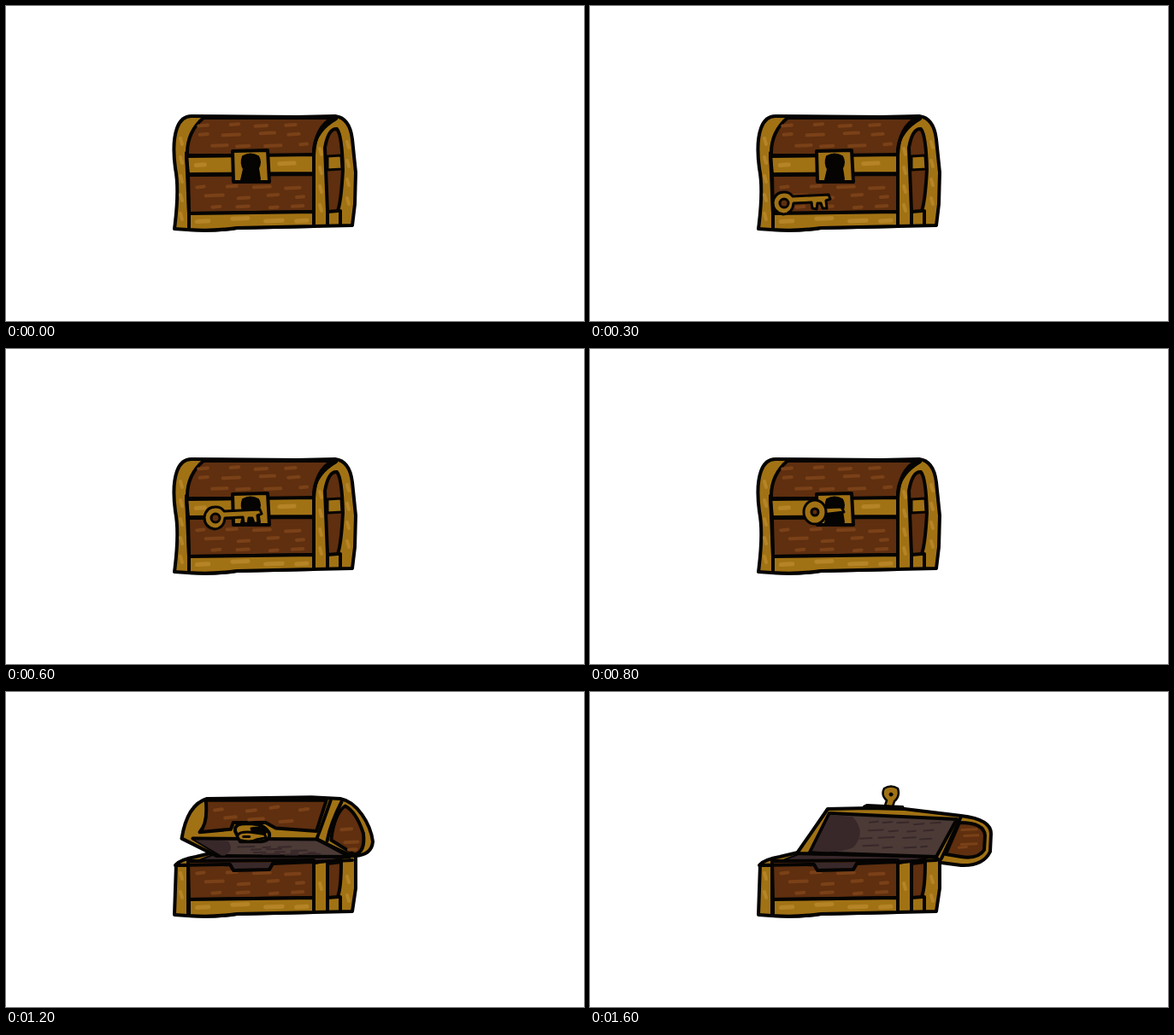
These frames come from a looping animation (676x369 px, 1800 ms). An HTML page:

```html
<!DOCTYPE html>
<html lang="en">
<head>
<meta charset="utf-8">
<title>Treasure chest</title>
<style>
html, body { margin: 0; width: 100%; height: 100%; overflow: hidden; background: #fff; }
svg { display: block; width: 676px; height: 369px; }
</style>
</head>
<body>
<svg id="stage" viewBox="0 0 676 369" stroke-linecap="round" stroke-linejoin="round"></svg>
<script>
const stage = document.getElementById('stage');
const LOOP = 1800, STEP = 100;
const GOLD = '#a17214', SHINE = '#b58426', WOOD = '#5f2f0f', GRAIN = '#7a4118';
const INSIDE = '#4b3a36', SHADE = '#38282a', INK = '#050403';

const path = (d, fill = 'none', w = 4, ink = INK) =>
  `<path d="${d}" fill="${fill}" stroke="${ink}" stroke-width="${w}"/>`;
const ellipse = (x, y, rx, ry, fill, w = 3) =>
  `<ellipse cx="${x}" cy="${y}" rx="${rx}" ry="${ry}" fill="${fill}" stroke="${INK}" stroke-width="${w}"/>`;

function seeded(seed) {
  return () => (seed = (seed * 16807) % 2147483647) / 2147483647;
}

// Rows of short brush strokes inside a box; lean shifts each row sideways.
function strokes(x, y, w, h, rows, lean = 0, gap = 20) {
  const rnd = seeded(Math.round(x * 31 + y * 7 + w));
  let d = '';
  for (let r = 0; r < rows; r++) {
    const k = rows > 1 ? r / (rows - 1) : 0.5;
    const left = x + lean * k;
    for (let at = rnd() * gap; at < w - 6;) {
      const len = Math.min(8 + rnd() * 12, w - at);
      const py = y + h * k + (rnd() - 0.5) * 4;
      d += `M${left + at} ${py} L${left + at + len} ${py - 0.8} `;
      at += len + gap * (0.5 + rnd());
    }
  }
  return d;
}

// Shine marks spaced down a narrow post.
function postShine(x, top, bottom) {
  let d = '';
  for (let y = top; y < bottom; y += 22) d += `M${x} ${y} L${x + 2} ${y + 7} `;
  return path(d, 'none', 4, SHINE);
}

function lowerFront() {
  return path('M213 198 L360 197 L360 241 L214 243 Z', WOOD) +
    path(strokes(222, 212, 126, 23, 3), 'none', 4, GRAIN) +
    path('M214 243 L360 241 L360 258 L270 260 Q242 264 214 262 Z', GOLD) +
    path(strokes(222, 251, 130, 0, 1), 'none', 5, SHINE);
}

function sidePosts(top) {
  return path('M376 241 V256 M391 240 V256') + postShine(204, top, 245) +
    postShine(367, top + 12, 245) + postShine(399, top + 4, 245);
}

function closedChest() {
  return path('M197 261 Q203 215 198 190 Q194 160 200 143 Q205 129 217 129 L340 130 ' +
      'L385 129 Q402 131 405 156 L409 195 L408 232 L405 257 L270 260 Q240 265 197 261 Z', GOLD) +
    path('M212 175 Q211 148 231 131 L382 131 Q361 142 360 175 Z', WOOD) +
    path(strokes(224, 139, 128, 24, 3), 'none', 4, GRAIN) +
    path('M211 176 L360 174 L360 196 L213 197 Z', GOLD) +
    path(strokes(221, 186, 36, 0, 1) + strokes(318, 185, 36, 0, 1), 'none', 5, SHINE) +
    lowerFront() +
    path('M214 243 L211 172 M360 258 L360 168 Q362 146 386 132') +
    path('M376 241 L373 166 Q377 143 387 144 Q393 151 394 192 Q392 229 388 240 Z', WOOD) +
    path('M376 176 L392 175 L393 191 L376 192 Z', GOLD, 3) +
    sidePosts(155) +
    path('M265 170 L306 169 L308 206 L266 206 Z', GOLD) +
    path('M277 176 Q286 171 295 176 Q299 183 295 190 L297 203 L275 204 L278 191 Q274 184 277 176 Z', INK, 2);
}

function openBase() {
  return path('M197 261 L199 202 Q205 196 222 193 L243 188 L409 192 L409 230 L405 257 L270 260 Q240 265 197 261 Z', GOLD) +
    path('M213 202 L244 190 L402 193 L362 201 Z', SHADE, 2) +
    lowerFront() +
    path('M262 200 L312 200 L308 208 L267 209 Z', SHADE, 0) +
    path('M198 203 L262 202 L266 209 L308 208 L312 201 L405 197 M213 203 V260 M360 200 V258') +
    path('M376 201 L392 199 Q392 229 388 240 L376 241 Z', WOOD) +
    sidePosts(212);
}

// Bends the half-raised lid towards its closed shape, hinged at y 192.
const bend = d => d.replace(/(-?[\d.]+) (-?[\d.]+)/g, (_, x, y) => {
  const k = Math.max(0, (192 - y) / 72);
  return `${(+x - 27 * k * k).toFixed(1)} ${(+y + 60 * k * (1 - k) + 5 * k).toFixed(1)}`;
});

function risingLid(low) {
  const p = (d, ...style) => path(low ? bend(d) : d, ...style);
  return p('M213 154 Q236 124 262 120 L385 119 L418 120 C436 122 441 139 435 158 Q428 185 408 191 L246 191 Z', GOLD) +
    p('M260 121 L401 121 L374 146 L328 143 L319 138 L281 138 L275 144 L237 147 Q251 139 260 121 Z', WOOD) +
    p(strokes(264, 128, 112, 8, 2, -6), 'none', 4, GRAIN) +
    p('M226 154 L371 155 L402 193 L252 191 Z', INSIDE) +
    p('M228 156 L266 157 Q270 172 256 188 L252 189 Z', SHADE, 0) +
    p(strokes(274, 165, 74, 18, 4, 22, 10), 'none', 2, SHADE) +
    p('M387 156 Q403 131 420 125 Q430 129 428 148 Q422 176 408 184 Z', WOOD) +
    p(strokes(403, 146, 20, 24, 3, -2, 8), 'none', 4, GRAIN) +
    p('M371 154 Q387 137 406 121 M382 157 Q394 139 418 122 M371 155 L404 192') +
    p('M279 146 Q282 138 298 139 Q316 138 318 148 Q316 159 298 158 L280 158 Z', GOLD) +
    p('M299 143 Q314 141 315 147 Q308 152 298 149 Z', INK, 2) +
    p('M279 152 Q282 146 297 147 L312 149 L312 153 L301 155 Q291 160 280 156 Z', GOLD, 3) +
    p('M286 152 L293 152', 'none', 3);
}

function raisedLid() {
  return path('M320 134 L324 132 L366 134 L368 138 L320 137 Z', INK, 2) +
    path('M345 133 L347 127 Q340 121 344 113 Q352 108 360 113 Q363 122 356 128 L354 134 Z', GOLD, 2.5) +
    ellipse(352, 120, 2, 2, INK, 1) +
    path('M278 137 L325 136 L368 137 L434 145 Q469 149 469 166 L468 187 Q460 204 434 203 L411 200 L404 193 L242 189 Z', GOLD) +
    path('M280 142 L429 149 L405 193 L257 188 Z', INSIDE) +
    path('M281 144 L307 146 Q324 164 308 182 Q290 190 260 186 Z', SHADE, 0) +
    path(strokes(326, 154, 84, 27, 4, -16, 10), 'none', 2, SHADE) +
    path('M432 153 Q461 153 462 168 L461 185 Q454 196 434 193 L416 190 Z', WOOD) +
    path(strokes(434, 162, 22, 22, 4, -6, 8), 'none', 3, GRAIN) +
    path('M434 146 L411 195');
}

function freeKey(x, y) {
  const body = 'M10 -8 L52 -10 L54 -5 L49 -3 L50 6 L45 6 L43 0 L39 0 L38 7 L33 6 L32 -1 L11 0 ' +
    'Q10 12 -1 13 Q-13 11 -13 -1 Q-11 -13 0 -13 Q7 -13 10 -8 Z';
  return `<g transform="translate(${x} ${y})">${path(body, GOLD, 3)}${ellipse(0, 0, 5, 5, WOOD)}</g>`;
}

// The bow narrows as the key turns; turn runs 0 to 1.
function lockedKey(x, turn) {
  const y = 191 - 2 * turn;
  return path(`M${x + 8} ${y - 5 + 2 * turn} L294 ${185 + turn} L297 191 L${x + 8} ${y + 3}`, GOLD, 3) +
    ellipse(x, y, 13 + 5 * turn, 14 - 9 * turn, GOLD) +
    ellipse(x, y, 4, 4 - 2.8 * turn, turn > 0.5 ? INK : WOOD, 3 - turn);
}

// The key climbs to the chest, slows towards the lock, then slides in and turns.
function keyAt(n) {
  if (n < 1) return '';
  if (n < 7) {
    const fast = Math.min(n, 3) - 1, slow = Math.max(n - 3, 0);
    return freeKey(196 + 15.5 * fast + 6 * slow, 293 - 31 * fast - 11 * slow);
  }
  const turn = Math.max(0, (n - 8) / 3);
  return lockedKey((n < 8 ? 256 : 263) + 2 * turn, turn);
}

function scene(n) {
  if (n < 12) return closedChest() + keyAt(n);
  return openBase() + (n < 16 ? risingLid(n < 14) : raisedLid());
}

let shown = -1;
const start = performance.now();
function draw() {
  const n = Math.floor(((performance.now() - start) % LOOP) / STEP);
  const pose = n < 12 ? n : n - n % 2;
  if (pose !== shown) {
    shown = pose;
    stage.innerHTML = scene(pose);
  }
  requestAnimationFrame(draw);
}
draw();
</script>
</body>
</html>
```
